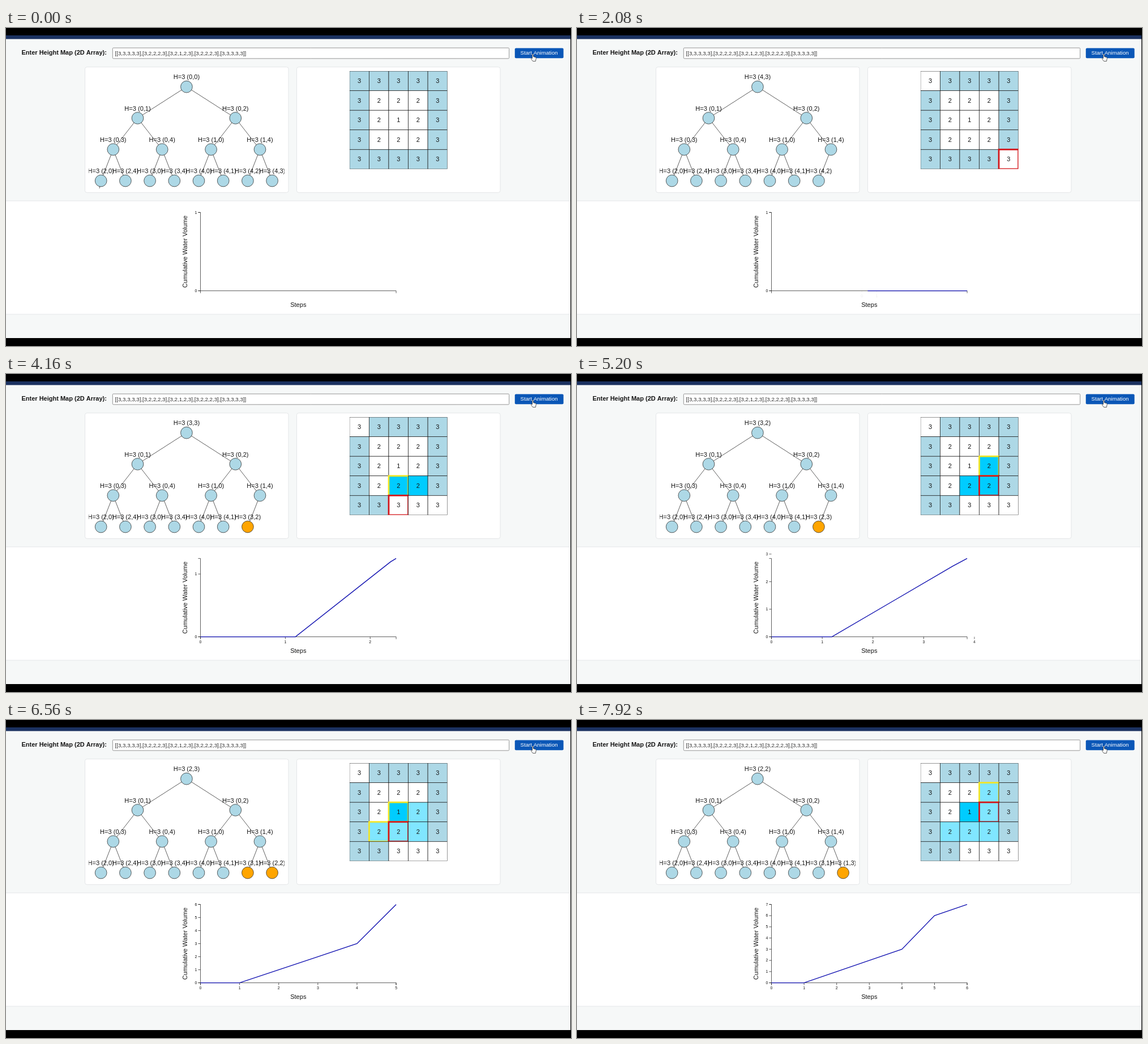
These frames come from a looping animation (998x561 px, 8 s). An HTML page with a canvas:

```html
<!DOCTYPE html>
<html lang="en">
<head>
<meta charset="utf-8">
<title>Trapped water with a heap</title>
<style>
html, body { margin: 0; width: 100%; height: 100%; overflow: hidden; background: #000; }
canvas { display: block; }
</style>
</head>
<body>
<canvas id="stage" width="998" height="561"></canvas>
<script>
const ctx = document.getElementById('stage').getContext('2d');
const LOOP = 8000, AXIS_MS = 300, LINE_MS = 500;
const STARTS = [0, 1000, 2000, 2986, 4021, 4991, 6000, 7000];
const U = 0.691; // page zoom
const SIZE = 5;
const MAP = [[3,3,3,3,3],[3,2,2,2,3],[3,2,1,2,3],[3,2,2,2,3],[3,3,3,3,3]];
const INK = '#151515', POOL = '#add8e6';

const lerp = (a, b, p) => a + (b - a) * p;
const clamp = v => Math.max(0, Math.min(1, v));
const ease = t => t < 0.5 ? 4 * t ** 3 : 1 - 4 * (1 - t) ** 3;

// Run the heap walk once and keep a snapshot of every step.
function simulate(steps) {
  const edge = (r, c) => r % (SIZE - 1) === 0 || c % (SIZE - 1) === 0;
  const key = (r, c) => r * SIZE + c;
  const heap = [], seen = new Set(), popped = new Set(), water = {}, volumes = [], states = [];
  let total = 0;
  for (let r = 0; r < SIZE; r++)
    for (let c = 0; c < SIZE; c++)
      if (edge(r, c)) { heap.push([r, c]); seen.add(key(r, c)); }
  const save = (current, fresh) => states.push({
    heap: heap.slice(), current, fresh, popped: new Set(popped),
    water: { ...water }, volumes: volumes.slice(), top: total || 1
  });
  save(-1, new Set());
  for (let n = 0; n < steps; n++) {
    const [r, c] = heap[0], fresh = new Set();
    heap[0] = heap.pop();
    popped.add(key(r, c));
    for (const [dr, dc] of [[0, 1], [1, 0], [0, -1], [-1, 0]]) {
      const y = r + dr, x = c + dc, k = key(y, x);
      if (!MAP[y] || !MAP[y][x] || seen.has(k)) continue;
      seen.add(k);
      fresh.add(k);
      heap.push([y, x]);
      water[k] = 3 - MAP[y][x];
      total += water[k];
    }
    volumes.push(total);
    save(key(r, c), fresh);
  }
  return states;
}
const states = simulate(STARTS.length - 1);

function text(str, x, y, size, align = 'center', color = INK, weight = '') {
  ctx.font = `${weight} ${size}px "Liberation Sans", Arial, sans-serif`;
  ctx.textAlign = align;
  ctx.fillStyle = color;
  ctx.fillText(str, x, y);
}

function rect(x, y, w, h, fill) {
  ctx.fillStyle = fill;
  ctx.fillRect(x, y, w, h);
}

function box(x, y, w, h, radius, fill, stroke) {
  ctx.beginPath();
  ctx.roundRect(x, y, w, h, radius);
  ctx.fillStyle = fill;
  ctx.fill();
  if (stroke) {
    ctx.strokeStyle = stroke;
    ctx.lineWidth = 0.9;
    ctx.stroke();
  }
}

function lines(points, color = INK, width = U) {
  ctx.beginPath();
  points.forEach(([x, y]) => ctx.lineTo(x, y));
  ctx.strokeStyle = color;
  ctx.lineWidth = width;
  ctx.stroke();
}

function clipped(x, y, w, h, draw) {
  ctx.save();
  ctx.beginPath();
  ctx.rect(x, y, w, h);
  ctx.clip();
  draw();
  ctx.restore();
}

function drawPointer() {
  ctx.save();
  ctx.translate(927, 45);
  ctx.beginPath();
  ctx.moveTo(2.6, 8.5);
  ctx.lineTo(2.6, 1.6);
  ctx.quadraticCurveTo(3.5, 0, 4.4, 1.6);
  ctx.lineTo(4.4, 5.6);
  ctx.lineTo(8.2, 6.6);
  ctx.quadraticCurveTo(9.4, 7, 9.3, 8.4);
  ctx.lineTo(8.4, 13.6);
  ctx.lineTo(3.7, 13.6);
  ctx.lineTo(0.5, 9.4);
  ctx.quadraticCurveTo(0.5, 7.6, 2.6, 8.5);
  ctx.closePath();
  ctx.fillStyle = '#fff';
  ctx.fill();
  ctx.strokeStyle = '#333';
  ctx.lineWidth = 0.8;
  ctx.stroke();
  ctx.restore();
}

function drawPage() {
  const right = 997;
  rect(0, 0, 998, 561, '#000');
  rect(0, 13, right, 7, '#1b3160');
  rect(0, 19.5, right, 527.5, '#f6f8f8');
  rect(0, 304.5, right, 201, '#e6e8e9');
  rect(0, 305.5, right, 199, '#fff');
  text('Enter Height Map (2D Array):', 27.5, 47.3, 11, 'left', INK, 'bold');
  box(188.3, 35.1, 700.4, 18.8, 1.5, '#fff', '#8a8a8a');
  text(JSON.stringify(MAP), 192.6, 47.6, 9.7, 'left', '#333');
  box(898.8, 35.6, 85.9, 17.6, 2, '#0b57b7');
  text('Start Animation', 941.6, 47.4, 9.68, 'center', '#fff');
  drawPointer();
  box(139.5, 68.8, 359.5, 221.5, 3.5, '#fff', '#e1e4e6');
  box(513.5, 68.8, 359.5, 221.5, 3.5, '#fff', '#e1e4e6');
}

function nodeAt(i) {
  const level = Math.floor(Math.log2(i + 1)), count = 2 ** level;
  return [146.1 + 345.6 * (i + 1.5 - count) / count, 103.7 + 80 * U * level];
}

function drawHeap({ heap, fresh }) {
  clipped(146.1, 76, 345.6, 207, () => {
    heap.forEach((_, i) => i && lines([nodeAt((i - 1) >> 1), nodeAt(i)]));
    heap.forEach(([r, c], i) => {
      const [x, y] = nodeAt(i);
      ctx.beginPath();
      ctx.arc(x, y, 15 * U, 0, 2 * Math.PI);
      ctx.fillStyle = fresh.has(r * SIZE + c) ? '#ffa500' : POOL;
      ctx.fill();
      ctx.strokeStyle = INK;
      ctx.lineWidth = U;
      ctx.stroke();
      text(`H=3 (${r},${c})`, x, y - 13.4, 11.06);
    });
  });
}

function cellColor(k, edge, state) {
  if (state.water[k]) {
    const most = Math.max(...Object.values(state.water));
    const p = state.water[k] / most;
    return `rgb(${lerp(255, 0, p)}, ${lerp(255, 204, p)}, 255)`;
  }
  return edge && !state.popped.has(k) ? POOL : '#fff';
}

function drawGrid(state) {
  const side = 50 * U, left = 606.9, top = 76.1;
  clipped(left, top, SIZE * side, SIZE * side, () => {
    for (let k = 0; k < SIZE * SIZE; k++) {
      const r = Math.floor(k / SIZE), c = k % SIZE;
      const x = left + c * side, y = top + r * side;
      const lit = k === state.current ? '#d3151a' : state.fresh.has(k) ? '#f2e526' : null;
      rect(x, y, side, side, cellColor(k, MAP[r][c] === 3, state));
      ctx.strokeStyle = lit || INK;
      ctx.lineWidth = lit ? 4 * U : U;
      ctx.strokeRect(x, y, side, side);
      text(MAP[r][c], x + side / 2, y + side / 2 + 3.9, 11.06);
    }
  });
}

const X0 = 343.5, Y0 = 463.6, W = 345.6, H = 138.2, TICK = 6 * U;
const part = (v, max) => max > 0 ? v / max : 0.5;
const spanX = s => s.volumes.length - 1;
const ticksX = s => s.volumes.length > 1 ? spanX(s) : -1;
const curve = s => s.volumes.map((v, i) => [X0 + W * part(i, spanX(s)), Y0 - H * v / s.top]);

// Ticks slide from the old scale to the new one; new ones fade in.
function slide(last, known, from, to, p, draw) {
  for (let v = 0; v <= last; v++) {
    ctx.globalAlpha = v <= known ? 1 : p;
    draw(v, lerp(part(v, from), part(v, to), p));
  }
  ctx.globalAlpha = 1;
}

function drawChart(prev, state, age) {
  const p = ease(clamp(age / AXIS_MS)), q = ease(clamp(age / LINE_MS));
  clipped(300, 311, 410, 192, () => {
    lines([[X0, Y0 + TICK], [X0, Y0], [X0 + W, Y0], [X0 + W, Y0 + TICK]]);
    lines([[X0 - TICK, Y0], [X0, Y0], [X0, Y0 - H], [X0 - TICK, Y0 - H]]);
    slide(ticksX(state), ticksX(prev), spanX(prev), spanX(state), p, (v, f) => {
      const x = X0 + W * f;
      lines([[x, Y0], [x, Y0 + TICK]]);
      text(v, x, 475.1, 6.91);
    });
    slide(state.top, prev.top, prev.top, state.top, p, (v, f) => {
      const y = Y0 - H * f;
      lines([[X0 - TICK, y], [X0, y]]);
      text(v, X0 - 9 * U, y + 2.3, 6.91, 'right');
    });
    const old = curve(prev);
    const path = curve(state).map(([x, y], i) =>
      old[i] ? [lerp(old[i][0], x, q), lerp(old[i][1], y, q)] : [x, y]);
    if (path.length > 1) lines(path, '#1010b0', 2 * U);
  });
  text('Steps', 516.3, 491.7, 11.06);
  ctx.save();
  ctx.translate(319.6, 394.6);
  ctx.rotate(-Math.PI / 2);
  text('Cumulative Water Volume', 0, 0, 11.06);
  ctx.restore();
}

function render(now) {
  const t = now % LOOP;
  const n = STARTS.filter(s => s <= t).length - 1;
  const state = states[n];
  drawPage();
  drawHeap(state);
  drawGrid(state);
  drawChart(states[Math.max(0, n - 1)], state, t - STARTS[n]);
}

let begin;
function frame(now) {
  begin ??= now;
  render(now - begin);
  requestAnimationFrame(frame);
}
render(0);
requestAnimationFrame(frame);
</script>
</body>
</html>
```
